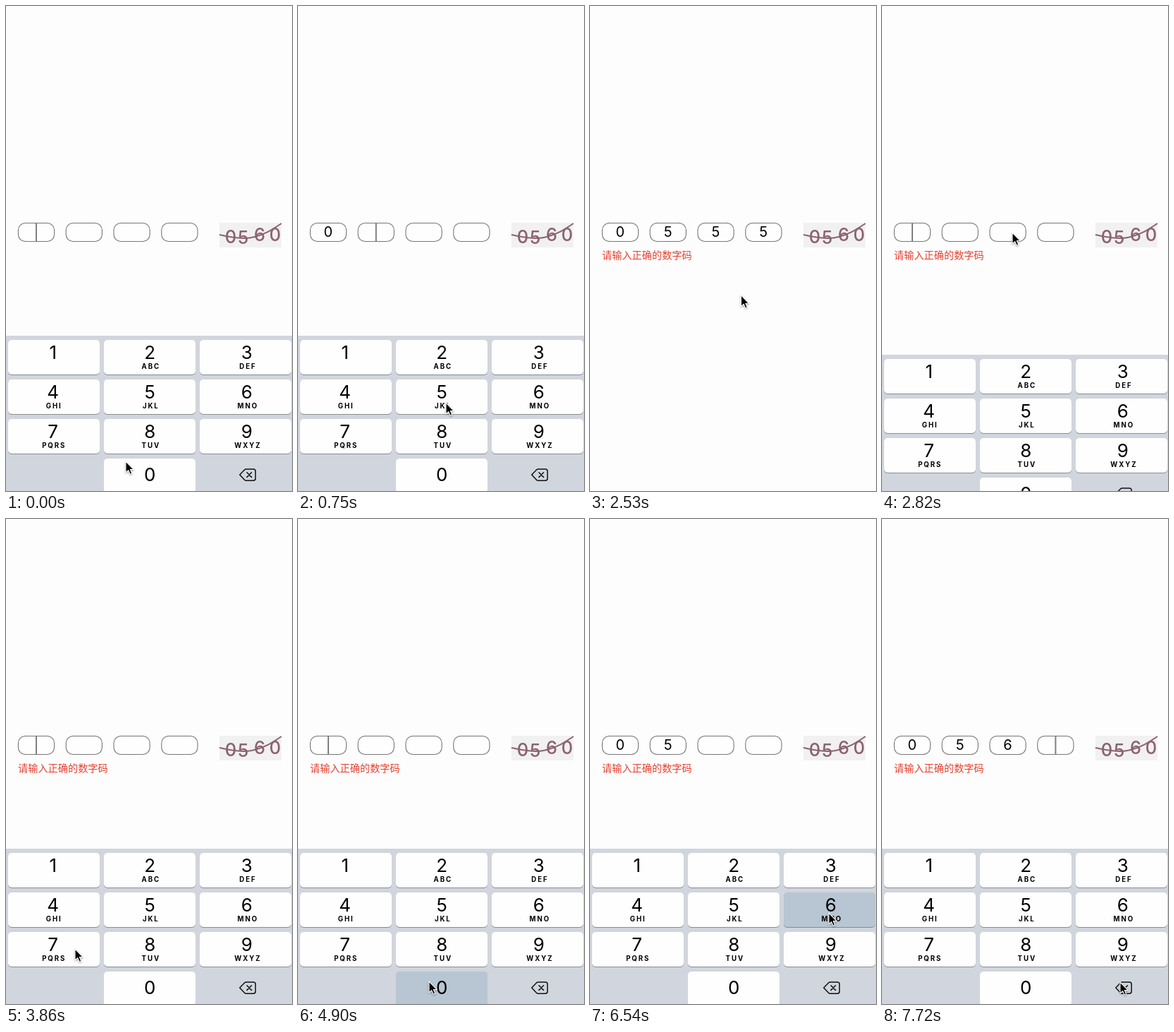
These frames come from a looping animation (406 px wide and 687 px high, 8000 ms). An HTML page:

```html
<!DOCTYPE html>
<html lang="zh">
<head>
<meta charset="utf-8">
<title>Code entry</title>
<style>
html, body { margin: 0; width: 100%; height: 100%; overflow: hidden; background: #fdfdfd; }
svg { display: block; width: 406px; height: 687px; }
text { font-family: Inter, Roboto, sans-serif; text-anchor: middle; }
.key-digit { font-size: 26px; }
.key-letters { font-size: 9.7px; font-weight: 700; letter-spacing: 1.9px; }
.digit { font-size: 20px; }
.captcha text { font-size: 25.5px; font-weight: 500; fill: #8b6271; }
.error { font-family: "Noto Sans CJK SC", "Noto Sans CJK", "Noto Sans SC", sans-serif; font-size: 14.2px; text-anchor: start; fill: #e5402f; }
</style>
</head>
<body>
<svg viewBox="0 0 406 687">
  <rect width="406" height="687" fill="#fdfdfd"/>
  <g id="fields"></g>
  <g class="captcha">
    <rect x="303" y="307" width="88" height="35" fill="#f1f1f1"/>
    <text x="319" y="336.3">0</text>
    <text x="336.7" y="337.3">5</text>
    <text x="360" y="332.6">6</text>
    <text x="382" y="332.6">0</text>
    <path d="M303 324 C318 327 337 331.5 353 327 S376 318 391 308" fill="none" stroke="#8b6271" stroke-width="2"/>
  </g>
  <text id="error" class="error" x="17" y="358.3">请输入正确的数字码</text>
  <g id="keyboard">
    <rect y="467" width="406" height="240" fill="#d1d5dd"/>
    <g id="keys"></g>
    <g fill="none" stroke="#111" stroke-width="1.5" stroke-linejoin="round" stroke-linecap="round">
      <path d="M331.8 664 L338.6 656.9 Q339.6 655.9 341 655.9 H351 Q354.2 655.9 354.2 659.1 V669.1 Q354.2 672.3 351 672.3 H341 Q339.6 672.3 338.6 671.3 Z"/>
      <path d="M342 660.8 l6.6 6.6 m0 -6.6 l-6.6 6.6"/>
    </g>
  </g>
  <g id="pointer">
    <path d="M0 0 V16 L3.7 12.6 L6.2 18.3 L8.8 17.2 L6.4 11.6 H11.3 Z" fill="#000" stroke="#fff" stroke-width="1.1" stroke-linejoin="round" style="filter:drop-shadow(0 1px 1.2px rgba(0,0,0,.4))"/>
  </g>
</svg>
<script>
const LOOP = 8000, TICK = 148.4, LAST_TICK = 52;
const HIDE = 1656, SHOW = 2593, SLIDE = 290, KEYBOARD_HEIGHT = 220;
const PRESS = 150, BLINK = 1000, BLINK_ON = 700;
const MS_PER_PIXEL = 2.8;

// Time at which each key is released
const taps = [
  [590, '0'], [1030, '5'], [1180, '5'], [1330, '5'],
  [4960, '0'], [5780, '5'], [6670, '6']
].map(([at, key]) => ({ at, key }));

// Where the pointer goes, and when it gets there
const stops = [
  [0, 170, 645], [145, 186, 653], [740, 210, 562], [1780, 265, 562], [2815, 185, 321],
  [3855, 98, 609], [4700, 186, 655], [5190, 210, 556], [6390, 339, 558], [7715, 338, 656]
].map(([at, x, y]) => ({ at, x, y }));

const $ = id => document.getElementById(id);
const show = (el, on) => el.setAttribute('visibility', on ? 'visible' : 'hidden');

function add(parent, tag, attrs, text = '') {
  const el = document.createElementNS('http://www.w3.org/2000/svg', tag);
  for (const name in attrs) el.setAttribute(name, attrs[name]);
  el.textContent = text;
  parent.appendChild(el);
  return el;
}

const keys = {};
['1', '2 ABC', '3 DEF', '4 GHI', '5 JKL', '6 MNO', '7 PQRS', '8 TUV', '9 WXYZ', '', '0'].forEach((label, i) => {
  if (!label) return;
  const [digit, letters] = label.split(' ');
  const column = i % 3, y = 473 + 56 * Math.floor(i / 3);
  const box = { x: 3 + 136 * column, width: 130, height: 49, rx: 5 };
  const middle = 66.7 + 137.6 * column;
  add($('keys'), 'rect', { ...box, y: y + 1, fill: '#898c91' });
  keys[digit] = add($('keys'), 'rect', { ...box, y, fill: '#fefefe' });
  add($('keys'), 'text', { class: 'key-digit', x: middle, y: y + (digit === '0' ? 32.2 : 26.6) }, digit);
  if (letters) add($('keys'), 'text', { class: 'key-letters', x: middle + 1.5, y: y + 41 }, letters);
});

const fields = [0, 1, 2, 3].map(i => {
  const x = 17.4 + 67.8 * i;
  add($('fields'), 'rect', { x, y: 307.5, width: 51.2, height: 26, rx: 10, fill: '#fefefe', stroke: '#777', 'stroke-width': 1.1 });
  return {
    digit: add($('fields'), 'text', { class: 'digit', x: x + 25.4, y: 327.4 }),
    caret: add($('fields'), 'rect', { x: x + 24.6, y: 308, width: 2, height: 25, fill: '#808080' })
  };
});

function ease(p) {
  p = Math.min(1, Math.max(0, p));
  return p * p * (3 - 2 * p);
}

// Travel time grows with distance; the pointer rests before it leaves
function pointerAt(t) {
  let { x, y } = stops[0];
  for (const stop of stops.slice(1)) {
    const dx = stop.x - x, dy = stop.y - y;
    const travel = Math.hypot(dx, dy) * MS_PER_PIXEL;
    const u = ease(1 - (stop.at - t) / travel);
    x += dx * u;
    y += dy * u;
    if (u < 1) break;
  }
  return [x, y];
}

function draw(t) {
  const focus = t < SHOW ? 0 : SHOW;
  const entered = taps.filter(tap => tap.at > focus && tap.at <= t);
  const changed = entered.length ? entered[entered.length - 1].at : focus;
  const caretOn = (t - changed) % BLINK < BLINK_ON;
  fields.forEach((field, i) => {
    field.digit.textContent = entered[i] ? entered[i].key : '';
    show(field.caret, caretOn && i === entered.length);
  });

  const down = taps.find(tap => t >= tap.at - PRESS && t < tap.at);
  for (const digit in keys) {
    keys[digit].setAttribute('fill', down && down.key === digit ? '#b8c5d2' : '#fefefe');
  }

  const hidden = ease((t - HIDE) / SLIDE) - ease((t - SHOW) / SLIDE);
  $('keyboard').setAttribute('transform', `translate(0 ${Math.round(KEYBOARD_HEIGHT * hidden)})`);
  show($('error'), t > HIDE + SLIDE * 0.9);
  $('pointer').setAttribute('transform', `translate(${pointerAt(t)})`);
}

const start = performance.now();
function loop() {
  const ms = (performance.now() - start) % LOOP;
  // The picture is sampled in even ticks; the last one is held longer
  const tick = Math.min(LAST_TICK, Math.floor((ms + 4) / TICK));
  draw(tick * TICK);
  requestAnimationFrame(loop);
}
loop();
</script>
</body>
</html>
```
